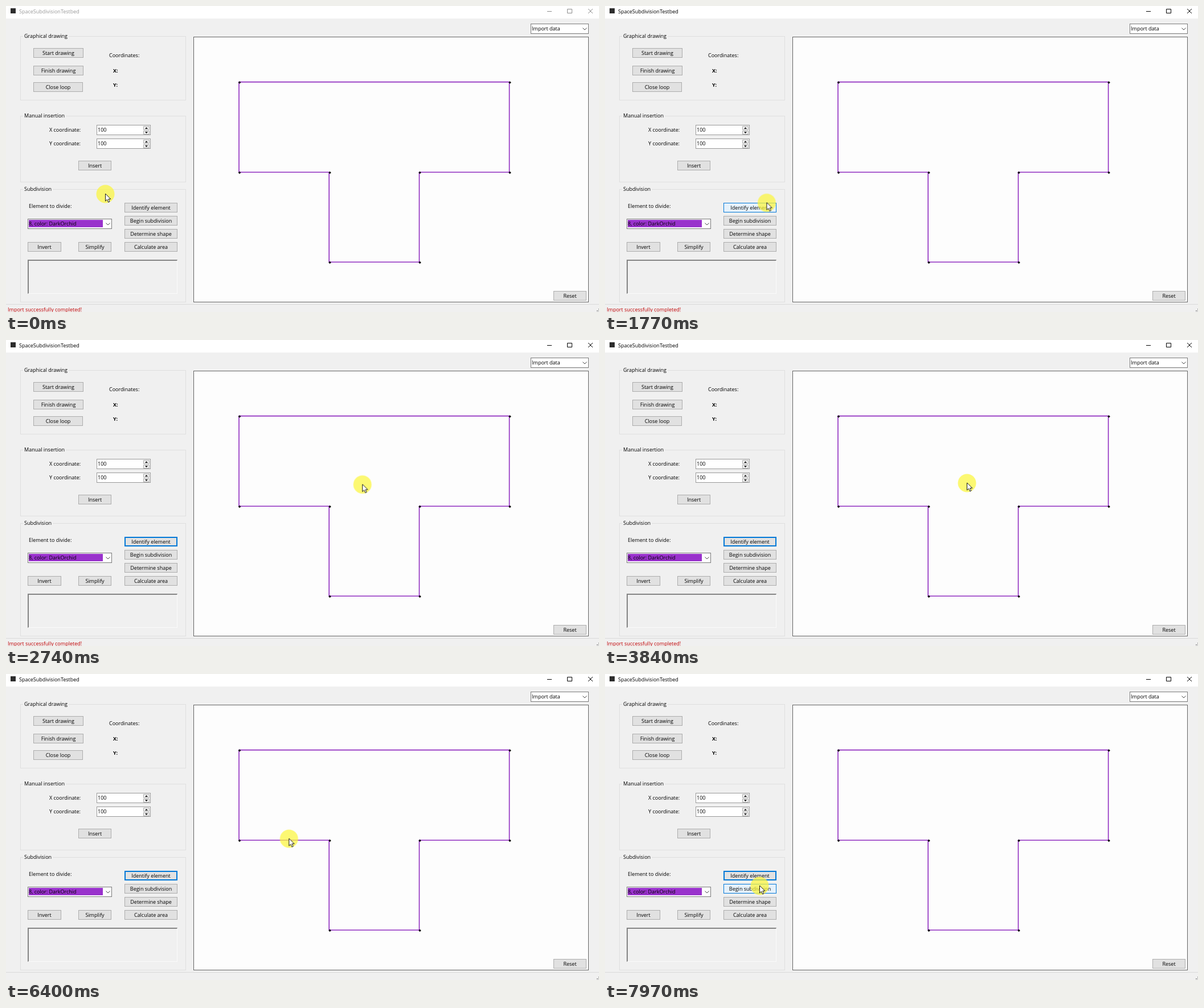
Animation of 1041 by 538 pixels, one loop 8 s. Source, as an HTML page:

```html
<!DOCTYPE html>
<html lang="en">
<head>
<meta charset="utf-8">
<title>SpaceSubdivisionTestbed</title>
<style>
html, body { margin: 0; width: 100%; height: 100%; overflow: hidden; }
#stage {
  position: relative; width: 1041px; height: 538px; overflow: hidden;
  background: #f0f0f0; color: #000;
  font: 9px "Open Sans", "Noto Sans", sans-serif; white-space: nowrap;
}
#stage > * { position: absolute; box-sizing: border-box; }
svg { left: 0; top: 0; }
.label { line-height: 13px; }
.bold { font-weight: 700; }
.btn {
  display: flex; align-items: center; justify-content: center;
  height: 17px; background: #e1e1e1; box-shadow: inset 0 0 0 1px #adadad;
}
.side { left: 208px; width: 93px; }
.group { left: 25px; width: 291px; border: 1px solid #dfdfdf; }
.group span { position: absolute; left: 4px; top: -8px; padding: 0 2px; line-height: 13px; background: #f0f0f0; }
.box { background: #fff; border: 1px solid #7a7a7a; }
.spin { left: 159px; width: 95px; height: 18px; padding-left: 1px; line-height: 15px; border-color: #999; }
.list { left: 38px; top: 446px; width: 263px; height: 60px; border: solid #fafafa; border-width: 2px 1px 1px 2px; border-top-color: #858585; border-left-color: #858585; }

/* One 8 s clock drives every part */
.anim { animation: 8s infinite step-end; }
#title { animation-name: title; }
#frame { animation-name: frame; }
#identify { animation-name: identify; }
#begin { animation-name: begin; }
#status { animation-name: status; }
#tip { animation-name: tip; animation-timing-function: linear; }
#pointer { animation: move 8s infinite linear; }

@keyframes title { 0% { color: #999; } 18.5%, 100% { color: #000; } }
@keyframes frame { 0% { stroke: #8c8c8c; } 18.5%, 100% { stroke: #000; } }
@keyframes identify {
  0% { background: #e1e1e1; box-shadow: inset 0 0 0 1px #adadad; }
  10.3% { background: #e5f1fb; box-shadow: inset 0 0 0 1px #0078d7; }
  18.5% { background: #cce4f7; box-shadow: inset 0 0 0 1px #005499; }
  19.6% { background: #e5f1fb; box-shadow: inset 0 0 0 1px #0078d7; }
  23% { background: #e1e1e1; box-shadow: inset 0 0 0 2px #0078d7; }
  86% { background: #e5f1fb; box-shadow: inset 0 0 0 1px #0078d7; }
  90.2%, 100% { background: #e1e1e1; box-shadow: inset 0 0 0 2px #0078d7; }
}
@keyframes begin {
  0% { background: #e1e1e1; box-shadow: inset 0 0 0 1px #adadad; }
  92.8%, 100% { background: #e5f1fb; box-shadow: inset 0 0 0 1px #0078d7; }
}
@keyframes status { 0% { opacity: 1; } 56%, 100% { opacity: 0; } }
@keyframes tip { 0%, 56% { opacity: 0; } 58.75%, 70.5% { opacity: 1; } 73%, 100% { opacity: 0; } }
@keyframes move {
  0% { transform: translate(174px, 330px); }
  7.5% { transform: translate(174px, 330px); animation-timing-function: ease-in; }
  10.875% { transform: translate(217px, 350px); animation-timing-function: ease-out; }
  17.5% { transform: translate(252px, 354px); }
  18.8% { transform: translate(252px, 354px); animation-timing-function: ease-in; }
  28.75% { transform: translate(451px, 300px); animation-timing-function: ease-out; }
  35.5% { transform: translate(635px, 251px); }
  75.5% { transform: translate(635px, 251px); animation-timing-function: cubic-bezier(.42, 0, .6, 1); }
  85.5% { transform: translate(293px, 345px); }
  86.75% { transform: translate(290px, 347px); animation-timing-function: ease-out; }
  94.6% { transform: translate(272px, 370px); }
  98% { transform: translate(272px, 370px); }
  99.6%, 100% { transform: translate(271px, 372px); }
}
</style>
</head>
<body>
<div id="stage">
  <div style="left:0;top:0;width:1041px;height:22px;background:#fff"></div>
  <div class="label anim" id="title" style="left:23px;top:3px">SpaceSubdivisionTestbed</div>

  <div class="group" style="top:53px;height:113px"><span>Graphical drawing</span></div>
  <div class="btn" style="left:48px;top:74px;width:88px">Start drawing</div>
  <div class="btn" style="left:48px;top:105px;width:88px">Finish drawing</div>
  <div class="btn" style="left:48px;top:134px;width:87px">Close loop</div>
  <div class="label" style="left:181px;top:80px">Coordinates:</div>
  <div class="label bold" style="left:188px;top:107px">X:</div>
  <div class="label bold" style="left:188px;top:132px">Y:</div>

  <div class="group" style="top:193px;height:117px"><span>Manual insertion</span></div>
  <div class="label" style="left:76px;top:211px">X coordinate:</div>
  <div class="label" style="left:76px;top:235px">Y coordinate:</div>
  <div class="box spin" style="top:209px">100</div>
  <div class="box spin" style="top:233px">100</div>
  <div class="btn" style="left:127px;top:272px;width:58px">Insert</div>

  <div class="group" style="top:322px;height:199px"><span>Subdivision</span></div>
  <div class="label" style="left:40px;top:345px">Element to divide:</div>
  <div class="box" style="left:38px;top:374px;width:148px;height:18px"></div>
  <div class="label" style="left:40px;top:376px;width:130px;height:13px;background:#9932cc">8, color: DarkOrchid</div>
  <div class="btn side anim" id="identify" style="top:346px">Identify element</div>
  <div class="btn side anim" id="begin" style="top:369px">Begin subdivision</div>
  <div class="btn side" style="top:392px">Determine shape</div>
  <div class="btn side" style="top:415px">Calculate area</div>
  <div class="btn" style="left:38px;top:415px;width:59px">Invert</div>
  <div class="btn" style="left:127px;top:415px;width:58px">Simplify</div>
  <div class="list"></div>

  <div class="box" style="left:921px;top:31px;width:102px;height:18px"></div>
  <div class="label" style="left:923px;top:33px">Import data</div>
  <div class="box" style="left:329px;top:54px;width:694px;height:467px;background:#fdfdfd;border-color:#646464"></div>
  <div class="btn" style="left:961px;top:501px;width:58px">Reset</div>

  <div style="left:0;top:524px;width:1041px;height:1px;background:#d9d9d9"></div>
  <div class="label anim" id="status" style="left:3px;top:527px;color:#c00000">Import successfully completed!</div>

  <svg width="1041" height="538">
    <defs>
      <path id="dot" d="M0-2.3L2.3 0 0 2.3-2.3 0Z"/>
      <path id="chevron" d="M-3.5-1.5L0 2 3.5-1.5" fill="none" stroke="#444"/>
      <g id="updown">
        <path d="M.5.5h10v6h-10zM.5 8.5h10v6h-10z" fill="#f0f0f0" stroke="#adadad"/>
        <path d="M3 5h5L5.5 2.2zM3 10.3h5L5.5 13z"/>
      </g>
    </defs>
    <rect x="8" y="4" width="9" height="9" fill="#2d2d2d"/>
    <path id="frame" class="anim" d="M950 9.5h8M985.5 5.5h8v7h-8zM1022 5l8 8M1030 5l-8 8" fill="none"/>
    <use href="#chevron" x="179" y="383"/>
    <use href="#chevron" x="1016" y="40"/>
    <use href="#updown" x="241" y="211"/>
    <use href="#updown" x="241" y="235"/>
    <path d="M409 133.6H883.6V292.2H725.5V450.2H567.2V292.2H409Z" fill="none" stroke="#8f2cc0" stroke-width="1.6"/>
    <use href="#dot" x="410" y="134.5"/>
    <use href="#dot" x="884.5" y="134.5"/>
    <use href="#dot" x="884.5" y="293"/>
    <use href="#dot" x="726.5" y="293"/>
    <use href="#dot" x="726.5" y="451"/>
    <use href="#dot" x="568.5" y="451"/>
    <use href="#dot" x="568.5" y="293"/>
    <use href="#dot" x="410" y="293"/>
    <path d="M1037 535h2v2h-2zM1040 532h1v2h-1zM1040 535h1v2h-1z" fill="#a0a0a0"/>
    <g id="tip" class="anim">
      <rect x="638" y="268" width="14" height="15" fill="#000" opacity=".35"/>
      <rect x="635.5" y="265.5" width="14" height="15" fill="#fff" stroke="#767676"/>
      <text x="642.5" y="276.3" fill="#575757" text-anchor="middle">8</text>
    </g>
    <g id="pointer">
      <circle cx=".5" cy=".5" r="16" fill="#fbf63c" opacity=".72"/>
      <path d="M.5 0V13L3.500 10.200 5.700 15 7.900 14 5.800 9.400H9.800Z" fill="#fff" stroke="#000" stroke-width=".9"/>
    </g>
  </svg>
</div>
</body>
</html>
```
